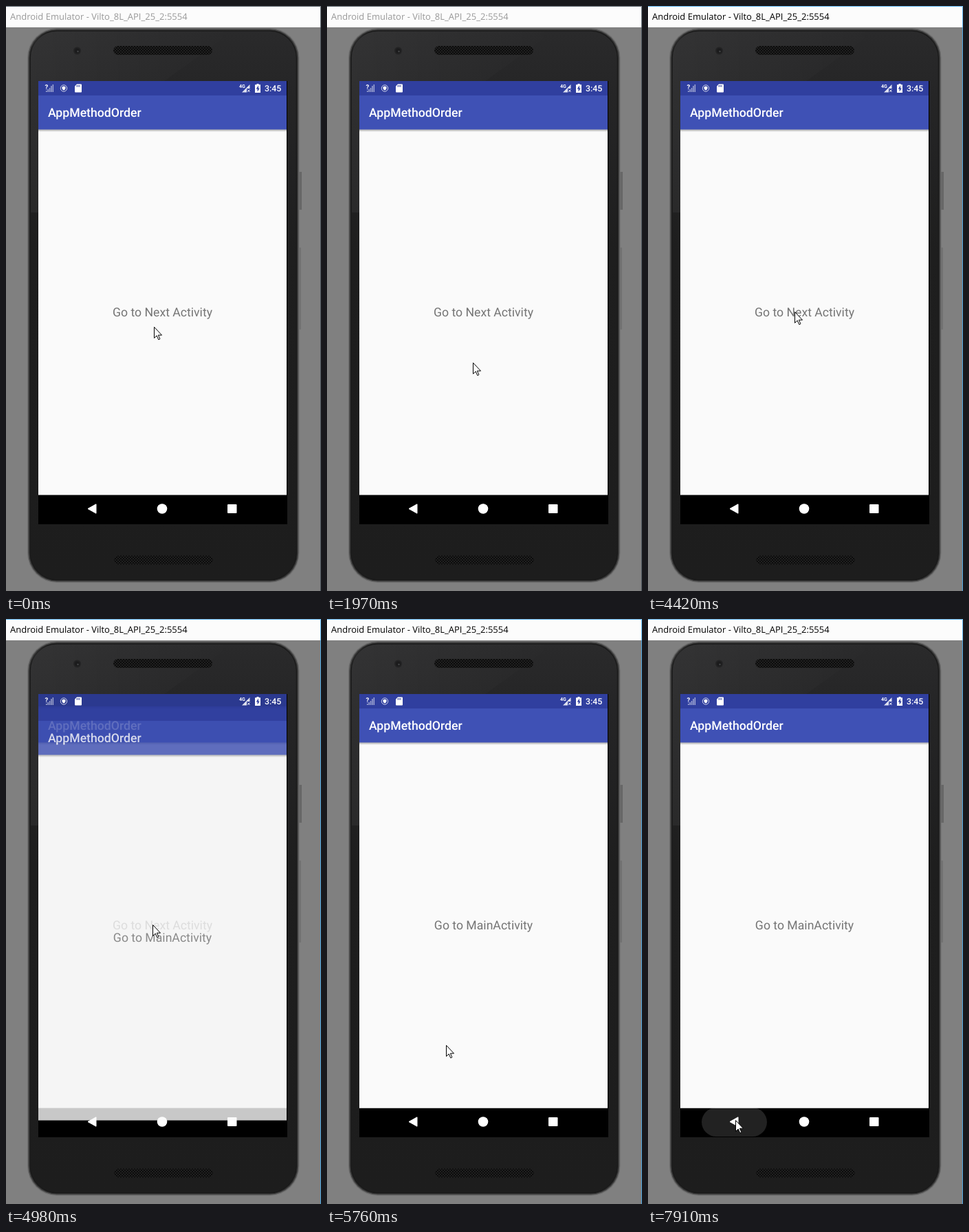
An HTML page that plays this animation: 458x850 px, repeating every 8 s.

```html
<!DOCTYPE html>
<html lang="en">
<head>
<meta charset="utf-8">
<title>Emulator demo</title>
<style>
  html, body { margin: 0; width: 100%; height: 100%; overflow: hidden; background: #808080; }
  svg { display: block; }
  text { font-family: Roboto, sans-serif; white-space: pre; text-rendering: geometricPrecision; }
  .caption { font: 13px "Open Sans", "Noto Sans", sans-serif; }
  .heading { font-size: 17.65px; font-weight: 500; fill: #fff; }
  .label { font-size: 17.65px; fill: #757575; text-anchor: middle; }
</style>
</head>
<body>
<svg width="458" height="850" viewBox="0 0 458 850">
  <defs>
    <linearGradient id="body" x2="0" y2="1">
      <stop offset="0" stop-color="#2a2a2b"/>
      <stop offset=".12" stop-color="#252526"/>
      <stop offset=".4" stop-color="#1e1e1e"/>
      <stop offset="1" stop-color="#1d1d1d"/>
    </linearGradient>
    <linearGradient id="gloss">
      <stop offset="0" stop-color="#fff" stop-opacity=".045"/>
      <stop offset="1" stop-color="#fff" stop-opacity="0"/>
    </linearGradient>
    <linearGradient id="shadow" x2="0" y2="1">
      <stop offset="0" stop-opacity=".32"/>
      <stop offset="1" stop-opacity="0"/>
    </linearGradient>
    <pattern id="mesh" width="4" height="4" patternUnits="userSpaceOnUse">
      <rect width="4" height="4" fill="#202020"/>
      <path d="M0 0h2v2h-2zM2 2h2v2h-2z" fill="#0c0c0c"/>
    </pattern>
    <clipPath id="navClip"><rect x="47" y="710" width="362" height="42"/></clipPath>
  </defs>

  <rect width="458" height="850" fill="#808080"/>

  <!-- phone -->
  <path d="M426 241h4v55h-4z" fill="#676767"/>
  <path d="M426 351h3v119h-3z" fill="#727272"/>
  <g id="shell"></g>
  <path d="M36 300V76Q36 37 76 37H330L230 109H47V300z" fill="url(#gloss)"/>
  <rect x="156" y="58" width="144" height="13" rx="6.5" fill="url(#mesh)"/>
  <rect x="157" y="798.5" width="144" height="13" rx="6.5" fill="url(#mesh)"/>
  <circle cx="103.5" cy="65" r="5.5" fill="#232324"/>
  <circle cx="103.5" cy="65" r="3.5" fill="#1b1b1c"/>
  <circle cx="104.5" cy="66" r="1.2" fill="#454748"/>

  <!-- navigation bar -->
  <rect x="47" y="109" width="362" height="644"/>
  <g clip-path="url(#navClip)">
    <rect id="ripple" y="710" height="42" rx="21" fill="#fff"/>
  </g>
  <g fill="#fff">
    <path d="M119 730.5L131 723.8V737.2z" stroke="#fff" stroke-linejoin="round"/>
    <circle cx="227" cy="730.5" r="7.3"/>
    <rect x="322" y="724" width="13.5" height="13" rx="1"/>
  </g>

  <g id="firstPage"></g>
  <rect id="dim" x="47" y="109" width="361" height="601" opacity=".1"/>
  <g id="nextPage"></g>

  <!-- status icons -->
  <g fill="#fff">
    <g id="signal" opacity=".55"></g>
    <text x="56.5" y="120.5" font-size="9.5" font-weight="700">?</text>
    <circle cx="84" cy="119.5" r="4.7" fill="none" stroke="#fff" opacity=".75"/>
    <path d="M84 116.500l2.500 1v2q0 2-2.500 3q-2.500-1-2.500-3v-2z"/>
    <path d="M103 113.500h6q1 0 1 1v10q0 1-1 1h-8q-1 0-1-1v-8z"/>
    <path d="M103 115v2.500M105 115v2.500M107 115v2.500" stroke="#303f9f"/>
    <text x="339" y="118.5" font-size="7" font-weight="700">4G</text>
    <path d="M343 125.500L354.500 114V120H350V125.500z" opacity=".85"/>
    <path d="M351 121.500l3.500 3.500M354.500 121.500l-3.500 3.500" stroke="#fff"/>
    <path d="M364.500 113h3v1.300h2.500v11.700h-8v-11.700h2.500z"/>
    <path d="M367 115.500l-3.300 5h1.900v4l3.200-5h-1.800z" fill="#303f9f"/>
    <text x="376" y="124" font-size="12.3" font-weight="500">3:45</text>
  </g>

  <!-- window frame -->
  <rect width="458" height="31" fill="#fcfcfc"/>
  <text id="caption" class="caption" x="6" y="20">Android Emulator - Vilto_8L_API_25_2:5554</text>
  <path id="frame" d="M0 .5H457.500V850" fill="none" stroke-opacity=".85"/>

  <path id="cursor" d="M.5 .5V16.500L4.200 13L6.800 18.800L8.900 17.800L6.400 12.200H11.500z" fill="#fff" stroke="#000"/>
</svg>
<script>
const LOOP = 8000, ACTIVATE = 4420, OPEN = 4980, PRESS = 7390;
const TICK = 130; // the screen refreshes in visible steps

// each stroke of the pointer: start time, ticks taken, destination
const strokes = [
  { start: 120, ticks: 2, x: 213, y: 463 },
  { start: 700, ticks: 2, x: 213, y: 520 },
  { start: 1970, ticks: 1, x: 212, y: 518 },
  { start: 2090, ticks: 5, x: 210, y: 451 },
  { start: 3770, ticks: 2, x: 213, y: 444 },
  { start: 5490, ticks: 3, x: 173, y: 619 },
  { start: 5880, ticks: 2, x: 147, y: 690 },
  { start: 6280, ticks: 3, x: 205, y: 462 },
  { start: 6700, ticks: 2, x: 116, y: 699 },
  { start: 6970, ticks: 3, x: 127, y: 728 }
];

const $ = id => document.getElementById(id);
const set = (id, attrs) => {
  for (const name in attrs) $(id).setAttribute(name, attrs[name]);
};
const lerp = (a, b, p) => a + (b - a) * p;
const easeOut = p => 1 - (1 - p) ** 2;

// eased progress, advancing once per tick
function progress(t, start, ticks) {
  const done = 1 + Math.floor((t - start) / TICK);
  return easeOut(Math.min(1, Math.max(0, done / ticks)));
}

const page = label => `
  <rect x="47" y="109" width="361" height="601.5" fill="#fafafa"/>
  <rect x="47" y="109" width="361" height="21" fill="#303f9f"/>
  <rect x="47" y="130" width="361" height="49.5" fill="#3f51b5"/>
  <rect x="47" y="179.5" width="361" height="3.5" fill="url(#shadow)"/>
  <text class="heading" x="61" y="161">AppMethodOrder</text>
  <text class="label" x="227.5" y="451">${label}</text>`;

$("firstPage").innerHTML = page("Go to Next Activity");
$("nextPage").innerHTML = page("Go to MainActivity");

// nested outlines form the bevelled edge
$("shell").innerHTML = ["#707070", "#4c4c4c", "#303030", "#181818", "url(#body)"]
  .map((fill, i) => `<rect x="${31 + 1.2 * i}" y="${32 + 1.2 * i}" width="${395.5 - 2.4 * i}"
    height="${806 - 2.4 * i}" rx="${43 - 1.2 * i}" fill="${fill}"/>`).join("");

$("signal").innerHTML = [2, 4, 6, 9, 11]
  .map((h, i) => `<rect x="${58 + 2.4 * i}" y="${125 - h}" width="1.5" height="${h}"/>`).join("");

function pointerAt(t) {
  let x = 215, y = 466;
  for (const stroke of strokes) {
    const p = progress(t, stroke.start, stroke.ticks);
    x = lerp(x, stroke.x, p);
    y = lerp(y, stroke.y, p);
  }
  return [Math.round(x), Math.round(y)];
}

function drawTransition(t) {
  const opening = t >= OPEN;
  const elapsed = 66 + 120 * Math.floor((t - OPEN) / 120);
  const rest = duration => Math.max(0, 1 - elapsed / duration);
  const shift = opening ? Math.round(51 * rest(350) ** 5) : 0;
  set("dim", { visibility: opening ? "visible" : "hidden" });
  set("nextPage", {
    opacity: opening ? 1 - rest(200) ** 4 : 0,
    transform: `translate(0 ${shift})`
  });
}

function draw(now) {
  const t = now % LOOP;
  const active = t >= ACTIVATE;
  const pressed = progress(t, PRESS, 3);
  const half = lerp(30, 47.5, pressed);

  set("cursor", { transform: `translate(${pointerAt(t)})` });
  set("ripple", { x: 125.5 - half, width: 2 * half, opacity: .135 * pressed });
  set("caption", { fill: active ? "#000" : "#999" });
  set("frame", { stroke: active ? "#3ba3e8" : "#3b4650" });
  drawTransition(t);
  requestAnimationFrame(draw);
}
requestAnimationFrame(draw);
</script>
</body>
</html>
```
